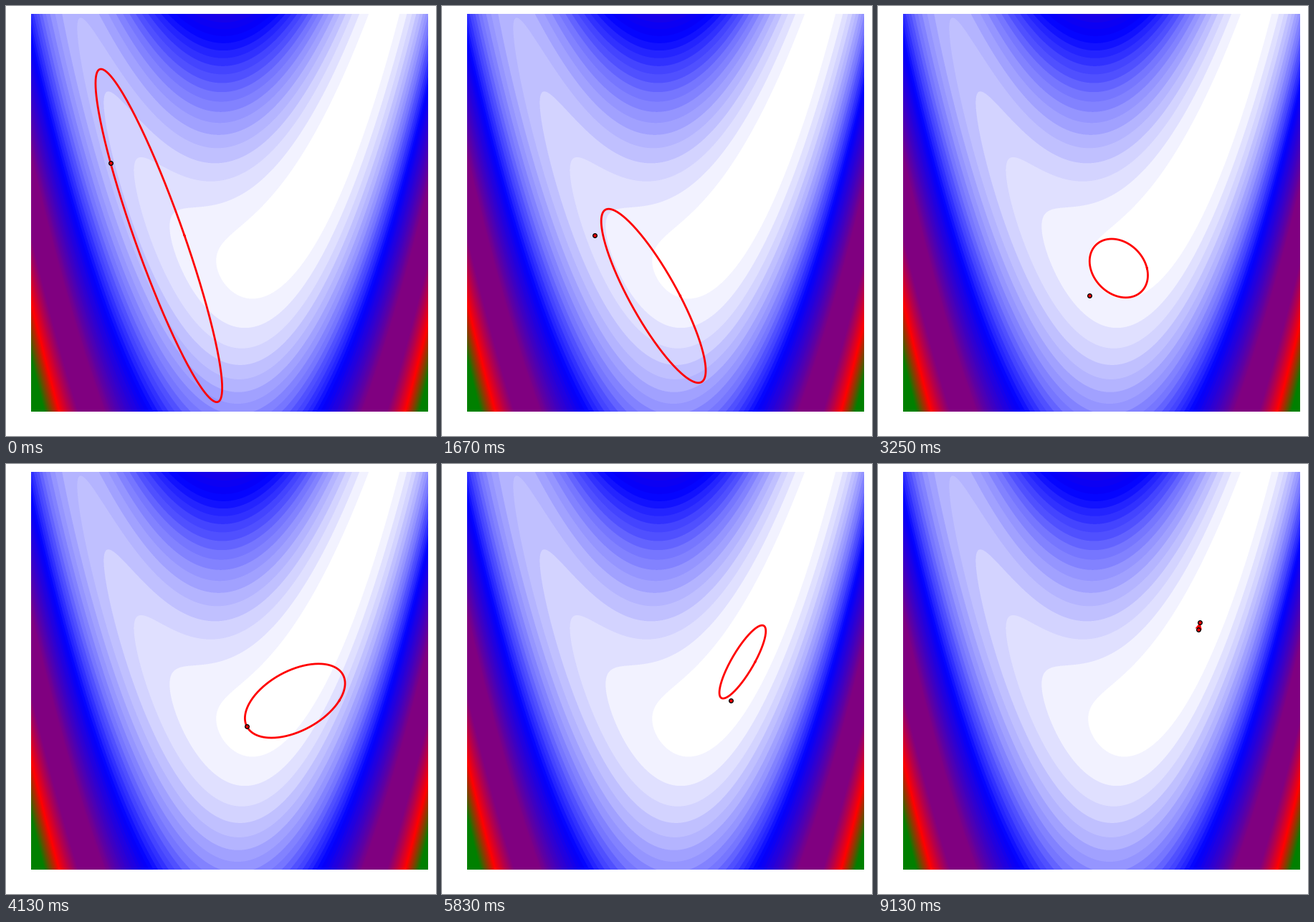
A matplotlib script for the animation above (9.58 s loop, 600x600 px).

```python
import numpy as np
import matplotlib.pyplot as plt
from matplotlib.animation import FuncAnimation

SIZE, LOOP_MS, INTERVAL = 600, 9580, 20
FPS, SEGMENT, SHRINK = 24, 33, 20          # ticks per second, ticks per step, ticks of shrinking
LEFT, RIGHT, TOP, BOTTOM = 35.4, 588.4, 11.7, 565.8
X_MIN, X_MAX, Y_MIN, Y_MAX = -2, 2, -1.5, 2.5
B = 4
BANDS = 101
WHITE, BLUE, PURPLE, RED, GREEN = (255, 255, 255), (0, 0, 255), (128, 0, 128), (255, 0, 0), (0, 128, 0)


def valley(x, y):
    return (1 - x) ** 2 + B * (y - x * x) ** 2


def gradient(p):
    x, y = p
    r = y - x * x
    return np.array([-2 * (1 - x) - 4 * B * x * r, 2 * B * r])


def hessian(p):
    x, y = p
    return np.array([[2 - 4 * B * (y - x * x) + 8 * B * x * x, -4 * B * x],
                     [-4 * B * x, 2 * B]])


def to_pixels(points):
    x, y = np.asarray(points).T
    return np.array([LEFT + (x - X_MIN) / (X_MAX - X_MIN) * (RIGHT - LEFT),
                     BOTTOM - (y - Y_MIN) / (Y_MAX - Y_MIN) * (BOTTOM - TOP)]).T


def background(ss=3):
    """Banded height map with smooth band edges, filling whole pixels at its border."""
    px = (np.arange(SIZE * ss) + 0.5) / ss
    x = X_MIN + (px - LEFT) / (RIGHT - LEFT) * (X_MAX - X_MIN)
    y = Y_MIN + (BOTTOM - px) / (BOTTOM - TOP) * (Y_MAX - Y_MIN)
    X, Y = np.meshgrid(x, y)
    band = np.floor(valley(X, Y) / valley(X_MIN, Y_MIN) * BANDS).clip(0, BANDS - 1).astype(int)

    stops = np.array([WHITE, BLUE, PURPLE, PURPLE, RED, GREEN, GREEN])
    places = [0, 0.16, 1 / 3, 1 / 2, 2 / 3, 5 / 6, 1]
    t = (np.arange(BANDS) * 255 // (BANDS - 1)) / 255
    palette = np.stack([np.interp(t, places, c) for c in stops.T], axis=1)

    rgb = palette[band].reshape(SIZE, ss, SIZE, ss, 3).mean(axis=(1, 3))
    image = np.full((SIZE, SIZE, 3), 255, np.uint8)
    inside = (slice(int(TOP), int(BOTTOM) + 1), slice(int(LEFT), int(RIGHT) + 1))
    image[inside] = np.round(rgb[inside])
    return image


def newton_steps(start, count):
    """Pixel positions of the iterates and the model ellipse of each step."""
    angle = np.linspace(0, 2 * np.pi, 241)
    circle = np.array([np.cos(angle), np.sin(angle)])
    p, points, ellipses = np.array(start), [start], []
    for _ in range(count):
        H = hessian(p)
        d = -np.linalg.solve(H, gradient(p))
        radius = np.sqrt(d @ H @ d)
        shape = np.linalg.solve(np.linalg.cholesky(H).T, circle).T * radius
        p = p + d
        points.append(tuple(p))
        ellipses.append(to_pixels(p + shape))
    return to_pixels(points), ellipses


points, ellipses = newton_steps((-1.2, 1.0), 7)

fig = plt.figure(figsize=(6, 6), dpi=100, facecolor="white")
fig.figimage(background(), origin="upper", zorder=-1)
ax = fig.add_axes([0, 0, 1, 1], zorder=1)
ax.set_xlim(0, SIZE)
ax.set_ylim(SIZE, 0)
ax.axis("off")

outline, = ax.plot([], [], color="red", lw=2, solid_joinstyle="round", zorder=2)
shaft, = ax.plot([], [], color="red", lw=2, solid_capstyle="butt", zorder=2)
head, = ax.fill([0, 0, 0], [0, 0, 0], color="red", lw=0, zorder=3)
dots, = ax.plot([], [], "o", ms=4, mfc="red", mec="black", mew=1, zorder=4)


def set_arrow(tail, tip, length=9.5, half_width=4.7):
    u = (tip - tail) / np.hypot(*(tip - tail))
    side = half_width * np.array([-u[1], u[0]])
    base = tip - length * u
    shaft.set_data(*np.array([tail, base]).T)
    head.set_xy([tip, base + side, base - side])


def draw(n):
    tick = int(np.ceil((n * INTERVAL + 15) * FPS / 1000)) - 1
    step, k = divmod(tick, SEGMENT)
    tail, tip = points[step], points[step + 1]
    arrived = k > SHRINK

    outline.set_visible(not arrived)
    shaft.set_visible(arrived)
    head.set_visible(arrived)
    if arrived:
        set_arrow(tail, tip)
        dots.set_data(*np.array([tail, tip]).T)
    else:
        scale = np.sqrt(1 - k / SHRINK)
        outline.set_data(*(tip + scale * (ellipses[step] - tip)).T)
        dots.set_data(*tail[:, None])
    return outline, shaft, head, dots


anim = FuncAnimation(fig, draw, frames=LOOP_MS // INTERVAL, interval=INTERVAL, repeat=True)
plt.show()
```
